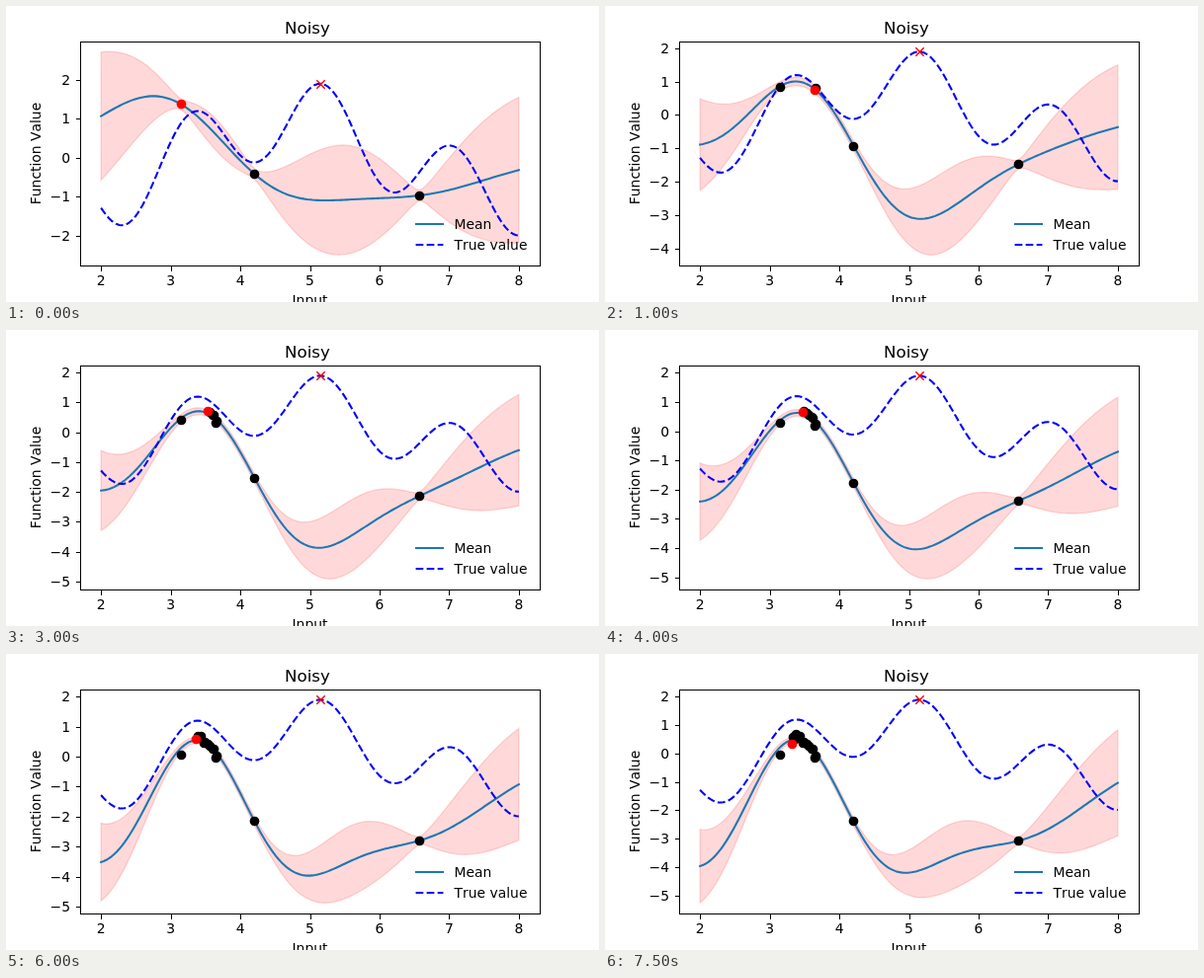
Recreate the animation shown at these times as an HTML page. Size 600 px wide and 300 px high, loop 8 s.

```html
<!DOCTYPE html>
<html lang="en">
<head>
<meta charset="utf-8">
<title>Noisy</title>
<style>
  html, body { margin: 0; width: 100%; height: 100%; overflow: hidden; background: #fff; }
  svg { display: block; font: 13.89px "DejaVu Sans", sans-serif; font-kerning: none; }
  .axis { fill: none; stroke: #000; stroke-width: 1; shape-rendering: crispEdges; }
  .band { fill: red; stroke: red; stroke-width: 1.39; fill-opacity: .15; stroke-opacity: .15; }
  .line { fill: none; stroke-width: 2.08; stroke-linejoin: round; }
  .mean { stroke: #1f77b4; stroke-linecap: square; }
  .true { stroke: #00f; stroke-dasharray: 7.71 3.33; }
  .cross { stroke: red; stroke-width: 1.39; }
</style>
</head>
<body>
<svg width="600" height="300" viewBox="0 0 600 300">
  <g id="plot"></g>
  <rect class="axis" x="75.5" y="36.5" width="465" height="227"/>
  <g id="xticks" text-anchor="middle"></g>
  <g text-anchor="middle">
    <text x="305" y="28" font-size="16.67">Noisy</text>
    <text x="307.5" y="302.5">Input</text>
    <text transform="translate(35 149.5) rotate(-90)">Function Value</text>
  </g>
  <path class="line mean" d="M415 221H442"/>
  <path class="line true" d="M414.6 242H442.4"/>
  <text x="453.6" y="226">Mean</text>
  <text x="453.6" y="247">True value</text>
</svg>
<script>
const STEP = 500, STEPS = 16, SAMPLES = 160, NOISE = 0.0025;
const TOP = 46.3, HEIGHT = 205.9, PEAK = 5.1457;

// Noisy observations [x, y] in the order they are made; each step adds one.
const data = [
  [4.2, -.41], [6.575, -.96], [3.15, 1.37], [3.66, 1.34], [3.65, 1.285], [3.615, 1.52],
  [3.596, 1.54], [3.565, 1.612], [3.53, 1.655], [3.492, 1.715], [3.468, 1.694], [3.432, 1.87],
  [3.411, 1.85], [3.383, 1.874], [3.354, 1.805], [3.37, 1.92], [3.338, 1.85], [3.312, 1.66]
];

const truth = x => -Math.sin(x) - Math.sin(10 * x / 3);
const kernel = (a, b) => Math.exp(-((a - b) ** 2) / 2);
const dot = (a, b) => a.reduce((sum, v, i) => sum + v * b[i], 0);
const average = a => a.reduce((sum, v) => sum + v, 0) / a.length;
const px = x => 96.14 + (x - 2) * 70.455;
const snap = v => Math.round(v) + .5;
const grid = Array.from({ length: SAMPLES + 1 }, (_, i) => 2 + 6 * i / SAMPLES);

function invert(matrix) {
  const n = matrix.length;
  const rows = matrix.map((row, i) => [...row, ...row.map((_, j) => +(i === j))]);
  for (let i = 0; i < n; i++) {
    const pivot = rows[i][i];
    rows[i] = rows[i].map(v => v / pivot);
    for (let j = 0; j < n; j++) {
      if (j === i) continue;
      const factor = rows[j][i];
      rows[j] = rows[j].map((v, k) => v - factor * rows[i][k]);
    }
  }
  return rows.map(row => row.slice(n));
}

// Gaussian process fitted to the standardised observations.
function fit(points) {
  const xs = points.map(p => p[0]), raw = points.map(p => p[1]);
  const mid = average(raw);
  const dev = Math.sqrt(average(raw.map(v => (v - mid) ** 2)));
  const ys = raw.map(v => (v - mid) / dev);
  const inverse = invert(xs.map((a, i) => xs.map((b, j) => kernel(a, b) + (i === j ? NOISE : 0))));
  const curve = grid.map(x => {
    const k = xs.map(v => kernel(x, v));
    const weights = inverse.map(row => dot(row, k));
    return { mean: dot(weights, ys), spread: 2 * Math.sqrt(1 + NOISE - dot(weights, k)) };
  });
  return { xs, ys, curve };
}

function draw(step) {
  const { xs, ys, curve } = fit(data.slice(0, step + 3));
  const upper = curve.map(c => c.mean + c.spread);
  const lower = curve.map(c => c.mean - c.spread);
  const max = Math.max(truth(PEAK), ...upper), min = Math.min(...lower);
  const scale = HEIGHT / (max - min);
  const py = y => TOP + (max - y) * scale;
  const trace = values => values.map((v, i) => px(grid[i]).toFixed(2) + ',' + py(v).toFixed(2));

  let out = `<path class="band" d="M${trace(upper).concat(trace(lower).reverse()).join('L')}Z"/>
    <path class="line mean" d="M${trace(curve.map(c => c.mean)).join('L')}"/>
    <path class="line true" d="M${trace(grid.map(truth)).join('L')}"/>
    <path class="cross" transform="translate(${snap(px(PEAK))} ${snap(py(truth(PEAK)))})"
      d="M-4.17-4.17L4.17 4.17M-4.17 4.17L4.17-4.17"/>`;
  xs.forEach((x, i) => {
    const color = i === xs.length - 1 ? 'red' : '#000';
    out += `<circle cx="${snap(px(x))}" cy="${snap(py(ys[i]))}" r="4.86" fill="${color}"/>`;
  });
  const margin = (max - min) / 20;
  for (let v = Math.ceil(min - margin); v <= max + margin; v++) {
    const y = py(v);
    out += `<path class="axis" d="M70.5 ${snap(y)}H75.5"/>
      <text x="65" y="${Math.round(y + 5)}" text-anchor="end">${String(v).replace('-', '−')}</text>`;
  }
  return out;
}

let ticks = '';
for (let v = 2; v <= 8; v++) {
  ticks += `<path class="axis" d="M${snap(px(v))} 264V269"/><text x="${px(v)}" y="283">${v}</text>`;
}
document.getElementById('xticks').innerHTML = ticks;

const plot = document.getElementById('plot');
const scenes = Array.from({ length: STEPS }, (_, i) => draw(i));
const start = performance.now();
let shown = -1;

function tick() {
  const step = Math.floor((performance.now() - start) / STEP) % STEPS;
  if (step !== shown) plot.innerHTML = scenes[shown = step];
  requestAnimationFrame(tick);
}
tick();
</script>
</body>
</html>
```
